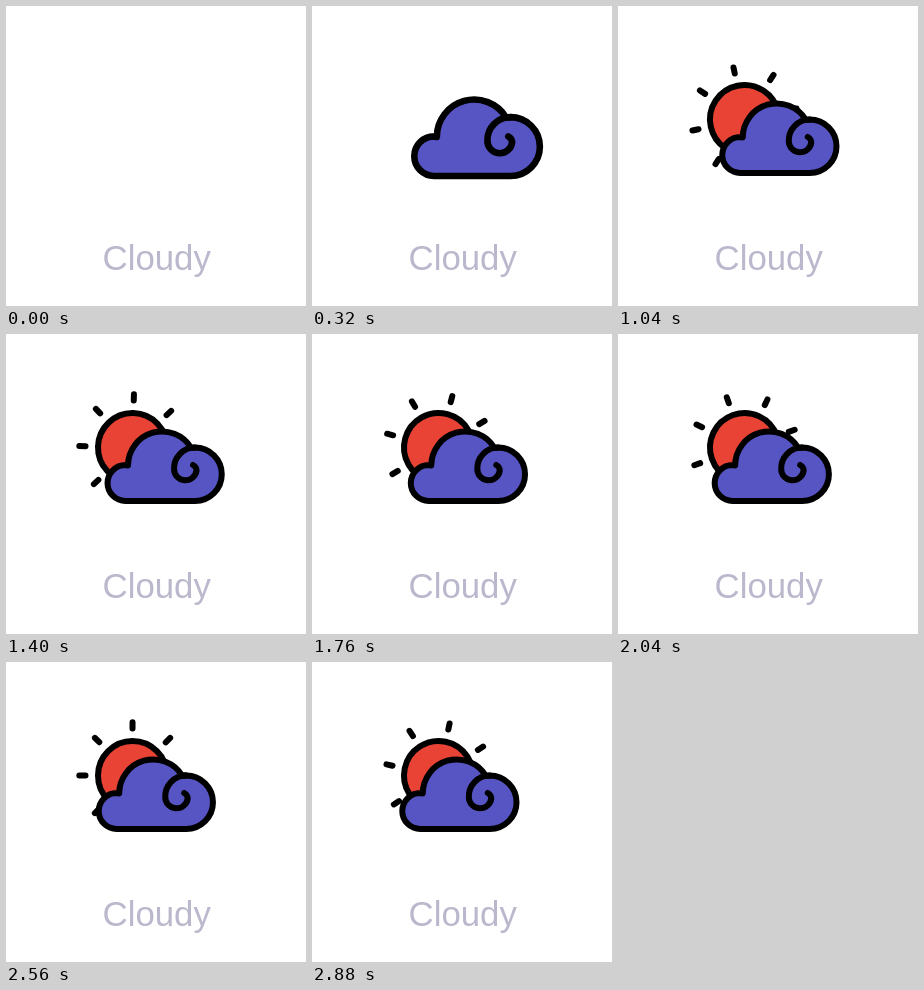
An HTML page for the animation above (2920 ms loop, 300 by 300 pixels).

```html
<!DOCTYPE html>
<html lang="en">
<head>
<meta charset="utf-8">
<title>Cloudy</title>
<style>
html, body { margin: 0; height: 100%; overflow: hidden; background: #fff; }
svg { display: block; width: 100%; height: 100%; }
.ink { stroke: #000; stroke-width: 6; stroke-linecap: round; stroke-linejoin: round; }
text { font: 34.8px "Liberation Sans", Arial, sans-serif; fill: #bab8cd; text-anchor: middle; }
</style>
</head>
<body>
<svg viewBox="0 0 300 300">
  <g id="sun" class="ink">
    <circle r="34.5" fill="#e84334"/>
    <g id="rays"></g>
  </g>
  <g id="cloud" class="ink">
    <g transform="translate(0 -5)">
      <path fill="#5755c4" d="M30-18.5A26.75 26.75 0 0 1 30 35H-39.5A18 18 0 0 1-39.5-1L-37-.5A34 34 0 0 1 26-18.3Z"/>
      <path fill="none" d="M28-1Q31.5 1 31.5 4.5A11.3 11.3 0 0 1 9 3A21 21 0 0 1 30-18.5"/>
    </g>
  </g>
  <text x="150.7" y="264.4">Cloudy</text>
</svg>
<script>
const LOOP = 2920;
const SUN_DELAY = 360;
const DRIFT_START = 550;
const POP = [[0, 0], [130, 1.2], [230, 0.9], [325, 1.1], [430, 1]];
const sun = document.getElementById('sun');
const rays = document.getElementById('rays');
const cloud = document.getElementById('cloud');

for (let a = 0; a < 360; a += 45) {
  const ray = document.createElementNS('http://www.w3.org/2000/svg', 'path');
  ray.setAttribute('d', 'M47 0H53.2');
  ray.setAttribute('transform', `rotate(${a})`);
  rays.append(ray);
}

// Scale that springs from nothing to full size
function pop(t) {
  if (t <= 0) return 0;
  const i = POP.findIndex(([end]) => t < end);
  if (i < 0) return 1;
  const [t0, s0] = POP[i - 1], [t1, s1] = POP[i];
  const k = (1 - Math.cos(Math.PI * (t - t0) / (t1 - t0))) / 2;
  return s0 + (s1 - s0) * k;
}

function place(el, x, y, scale, angle = 0) {
  el.setAttribute('visibility', scale > 0 ? 'visible' : 'hidden');
  el.setAttribute('transform', `translate(${x} ${y}) rotate(${angle}) scale(${scale})`);
}

function draw(t) {
  place(sun, 126.5, 113.5, pop(t - SUN_DELAY), 0.0375 * t - 6);
  place(cloud, 165.5 - 0.0076 * Math.max(0, t - DRIFT_START), 137, pop(t));
}

const start = performance.now();
function tick() {
  draw((performance.now() - start) % LOOP);
  requestAnimationFrame(tick);
}
draw(0);
requestAnimationFrame(tick);
</script>
</body>
</html>
```
